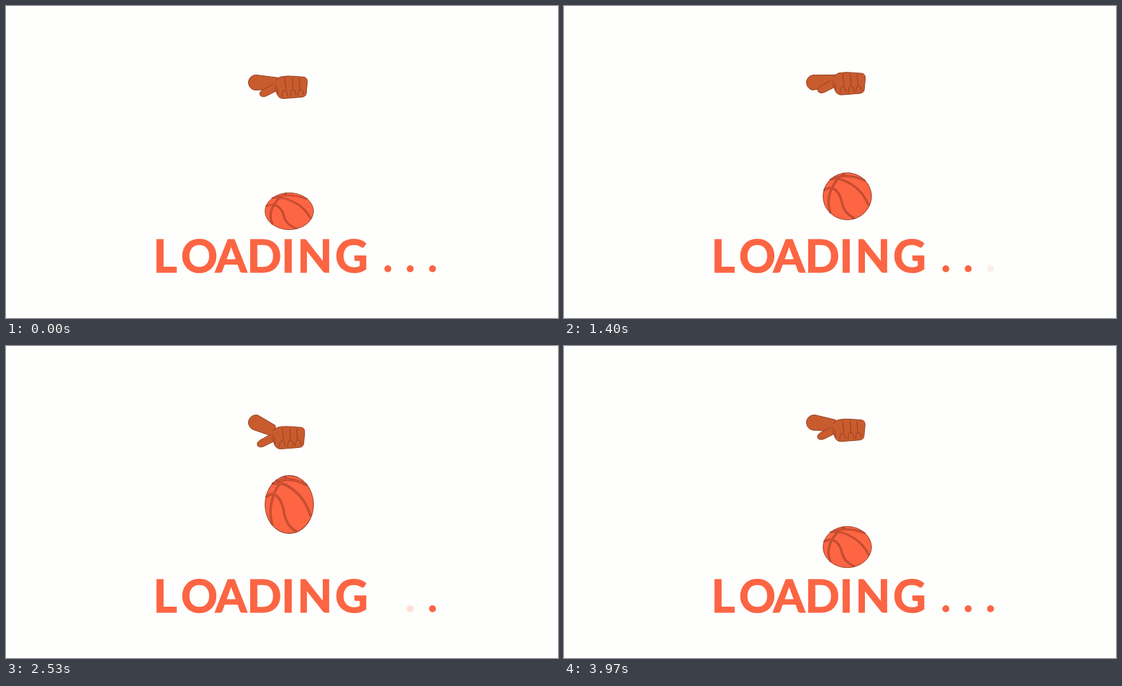
Write an HTML page that moves like this. It is 798 px wide and 450 px high and loops after 4000 ms.

```html
<!DOCTYPE html>
<html lang="en">
<head>
<meta charset="utf-8">
<title>Loading</title>
<style>
  html, body { margin: 0; height: 100%; overflow: hidden; background: #fefefc; }
  svg { display: block; width: 100vw; height: 100vh; }
  text { font: 700 65.5px Lato, sans-serif; text-anchor: middle; fill: #fc6543; stroke: #fc6543; stroke-width: 1.5; }
  .line { fill: none; stroke: #94401f; stroke-width: 1; stroke-linecap: round; }
  .skin { fill: #c95c2f; stroke: #94401f; stroke-width: 1; stroke-linejoin: round; }
  .seam { fill: none; stroke: #ab432c; stroke-width: 3; }
  .gap { fill: none; stroke: #e85a3c; stroke-width: 1; }
</style>
</head>
<body>
<svg viewBox="0 0 798 450">
  <defs>
    <path id="seams" d="M-4 -34C-24 -20 -32 5 -24 25M-34 -9C-18 -20 -10 -2 -8 8C-6 20 0 28 11 33M-25 -25C-5 -30 22 -12 31 14M-20 -27Q2 -35 26 -23"/>
  </defs>
  <text x="230 279.5 325.5 373.5 408 446.5 499.5" y="383.5">LOADING</text>
  <g id="dots" fill="#fc6543">
    <circle cx="552" cy="379" r="5"/>
    <circle cx="584.3" cy="379" r="5"/>
    <circle cx="616.6" cy="379" r="5"/>
  </g>
  <g id="ball">
    <circle r="35" fill="#fe6542"/>
    <use href="#seams" class="seam"/>
    <use href="#seams" class="gap"/>
    <circle r="35" fill="none" stroke="#8f3f2b"/>
  </g>
  <path id="arm" class="skin"/>
  <g id="fist">
    <path class="skin" d="M392 108L388 111L370 121Q365 125 368 129Q372 132 379 128L393 121Z"/>
    <path class="skin" d="M390 106Q396 100.5 402 101L408 100.5L418 101L431 102Q436 103 435.5 110L434 126Q433 130.5 427 131L401 133Q393 133 391 124L388 118Z"/>
    <path fill="#c95c2f" d="M385 108L396 106L395 120L386 116Z"/>
    <path class="line" d="M388 112Q392 114 393 126M403 103L405 120M414 103L415 121M424 104L425 121M399 130q0 -9 4 -9q4 0 4 8M411 130q0 -10 4 -10q4 0 4 8M422 129q0 -9 4 -9q4 0 4 7"/>
  </g>
</svg>
<script>
const LOOP = 4000, FPS = 30, BOUNCE = 20, DOTS = 60;
const $ = id => document.getElementById(id);
const clamp = v => Math.max(0, Math.min(1, v));
const ease = v => v * v * (3 - 2 * v);

function drawBall(phase) {
  const fall = Math.abs(2 * phase - 1); // 0 in the hand, 1 on the ground
  const y = 142 + 154 * ease(fall ** 1.2);
  // Stretches in flight, flattens on landing.
  const r = 35 + 10 * Math.sin(Math.PI * fall) ** 2 - 8 * fall ** 3;
  $('ball').setAttribute('transform', `translate(409.5 ${y}) scale(1 ${r / 35.5})`);
}

function drawHand(phase) {
  const turn = 2 * Math.PI * phase;
  const dy = 13.5 * Math.cos(turn + 1.11) - 4.2 * Math.cos(2 * turn) - 1.3;
  const dx = -(Math.max(0, dy) ** 2) / 64;
  const x = 393 + dx, y = 112 + dy * 0.75;
  $('fist').setAttribute('transform', `translate(${dx} ${dy})`);
  $('arm').setAttribute('d',
    `M${x} ${y - 9}L364 99.7A11 11 0 1 0 359 121.2L${x} ${y + 8}Z`);
}

function drawDots(beat) {
  [...$('dots').children].forEach((dot, i) => {
    const out = 6 + 6 * i, back = 28.5 + 6.5 * i;
    dot.setAttribute('opacity', 1 - clamp((beat - out) / 5) + clamp((beat - back) / 5));
  });
}

function draw(time) {
  const step = Math.floor((time % LOOP + 3.4) * FPS / 1000);
  const phase = step % BOUNCE / BOUNCE;
  drawBall(phase);
  drawHand(phase);
  drawDots(step % DOTS);
}

const start = performance.now();
function tick() {
  draw(performance.now() - start);
  requestAnimationFrame(tick);
}
tick();
</script>
</body>
</html>
```
